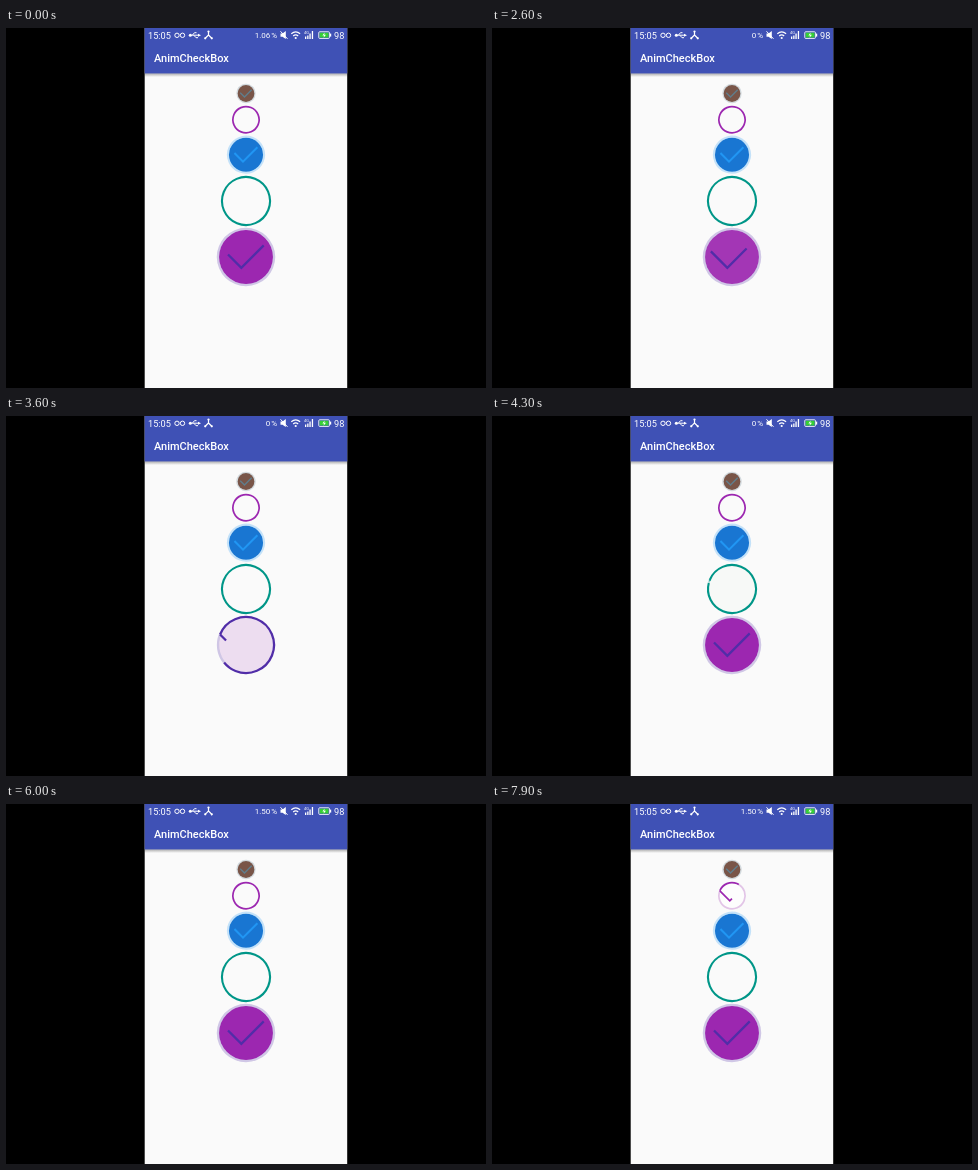
Write an HTML page that moves like this. It is 480x360 px and loops after 8 s.

```html
<!DOCTYPE html>
<html lang="en">
<head>
<meta charset="utf-8">
<title>AnimCheckBox</title>
<style>
  html, body { margin: 0; height: 100%; overflow: hidden; background: #000; }
  svg { display: block; width: 100vw; height: 100vh; }
  text { font-family: Roboto, sans-serif; fill: #fff; }
  .line { fill: none; stroke: #fff; }
</style>
</head>
<body>
<svg id="stage" viewBox="0 0 480 360">
  <defs>
    <linearGradient id="shade" x2="0" y2="1">
      <stop stop-color="#000" stop-opacity=".3"/>
      <stop offset="1" stop-color="#000" stop-opacity="0"/>
    </linearGradient>
  </defs>
  <rect width="480" height="360"/>
  <rect x="138.7" width="202.5" height="360" fill="#fafafa"/>
  <rect x="138.7" width="202.5" height="45.5" fill="#3f51b5"/>
  <rect x="138.7" y="45.5" width="202.5" height="3.5" fill="url(#shade)"/>

  <text x="142" y="10.8" font-size="9.2">15:05</text>
  <text x="148" y="34" font-size="11" font-weight="500">AnimCheckBox</text>
  <text id="rate" x="271" y="10" font-size="8" text-anchor="end"></text>
  <text x="328" y="10.8" font-size="9.2">98</text>

  <!-- infinity, usb, share -->
  <g class="line">
    <circle cx="171" cy="7.3" r="2.2"/>
    <circle cx="176.5" cy="7.3" r="2.2"/>
    <path d="M184 7.2H193M186.5 7L188.5 4.7H190.5M188 7.4L190 9.7H192"/>
    <path d="M202.5 3V7L199 10.5M202.5 7L206 10.5" stroke-width="1.2"/>
  </g>
  <g fill="#fff">
    <circle cx="184.3" cy="7.2" r="1.5"/>
    <path d="M192 5.7L195 7.2L192 8.7Z"/>
    <circle cx="202.5" cy="3.5" r="1.1"/>
    <circle cx="199.2" cy="10.3" r="1.1"/>
    <circle cx="205.8" cy="10.3" r="1.1"/>
    <!-- muted speaker -->
    <path d="M274.5 5.5H276.5L279.8 3V11L276.5 8.7H274.5Z"/>
    <!-- wifi dot and signal bars -->
    <circle cx="289.7" cy="10" r="1.1"/>
    <path d="M299 8.5h1.3V11H299ZM301.2 7.5h1.3V11h-1.3ZM303.4 5.5h1.3V11h-1.3ZM305.8 3h1.3V11h-1.3Z"/>
  </g>
  <path class="line" d="M274.5 3.3L281.5 10.8"/>
  <path class="line" d="M285.3 5.8Q289.7 1.8 294.1 5.8M287.2 8Q289.7 5.8 292.2 8" stroke-width="1.2"/>
  <text x="298" y="6" font-size="4">4G</text>
  <!-- battery -->
  <rect class="line" x="312.8" y="3.8" width="10.6" height="6.6" rx=".8" stroke-width=".9"/>
  <rect x="313.7" y="4.7" width="8.8" height="4.8" fill="#35cf35"/>
  <rect x="324" y="5.6" width="1.2" height="3" fill="#fff"/>
  <path d="M318.6 4.5L316.4 7.4H318.1L317.5 9.7L320 6.7H318.2Z" fill="#fff"/>
</svg>
<script>
const LOOP = 8000, DURATION = 550, CX = 240;
const stage = document.getElementById('stage');
const rate = document.getElementById('rate');

// Taps are the moments, in ms, at which a box is toggled.
const boxes = [
  { cy: 65.5, r: 9, width: 1.4, color: '#607d8b', fill: '#795548', checked: 1, taps: [] },
  { cy: 91.7, r: 13.1, width: 1.7, color: '#9c27b0', fill: '#fff', checked: 0, taps: [7594] },
  { cy: 126.7, r: 18, width: 2.1, color: '#2196f3', fill: '#1976d2', checked: 1, taps: [6430, 7080] },
  { cy: 173, r: 24, width: 2.1, color: '#009688', fill: '#4caf50', checked: 0, taps: [4255, 5206] },
  { cy: 229, r: 28, width: 2.3, color: '#512da8', fill: '#9c27b0', checked: 1, taps: [2506, 3468] }
];

function add(tag, attrs) {
  const el = document.createElementNS('http://www.w3.org/2000/svg', tag);
  for (const key in attrs) el.setAttribute(key, attrs[key]);
  return stage.appendChild(el);
}

for (const b of boxes) {
  const circle = { cx: CX, cy: b.cy };
  const ring = {
    ...circle, r: b.r, fill: 'none', stroke: b.color, 'stroke-width': b.width,
    pathLength: 360, transform: `rotate(202 ${CX} ${b.cy})`
  };
  b.disc = add('circle', { ...circle, r: b.r - b.width / 2 + .1, fill: b.fill });
  b.faint = add('circle', { ...ring, 'stroke-opacity': .25 });
  b.solid = add('circle', ring);
  b.hook = add('path', { fill: 'none', stroke: b.color, 'stroke-width': b.width });
}

// 0 = unchecked, 1 = checked
function progress(b, t) {
  const past = b.taps.filter(tap => tap <= t);
  const state = (b.checked + past.length) % 2;
  if (!past.length) return state;
  const p = Math.min(1, (t - past[past.length - 1]) / DURATION);
  const eased = (1 - Math.cos(Math.PI * p)) / 2;
  return state ? eased : 1 - eased;
}

// The hook grows from the ring's edge, then slides on along its own line.
function hookPath(b, f) {
  const x = CX - .927 * b.r, y = b.cy - .375 * b.r;
  const down = .76 * b.r, size = 1.275 * b.r, head = f * 1.56 * b.r;
  const tail = Math.max(0, head - size);
  const start = `M${x + tail} ${y + tail}`;
  if (head <= down) return `${start}L${x + head} ${y + head}`;
  return `${start}L${x + down} ${y + down}L${x + head} ${y + 2 * down - head}`;
}

function draw(t) {
  rate.textContent = (t < 1940 ? '1.06' : t < 4940 ? '0' : '1.50') + '\u200a%';
  for (const b of boxes) {
    const f = progress(b, t);
    const sweep = 360 * Math.max(0, 1 - f * 1.56 / 1.275);
    b.disc.setAttribute('fill-opacity', f);
    b.solid.setAttribute('stroke-dasharray', sweep < 360 ? `${sweep} 360` : 'none');
    b.faint.setAttribute('stroke-dasharray', sweep > 0 ? `0 ${sweep} ${360 - sweep} 0` : 'none');
    b.solid.setAttribute('visibility', sweep > 0 ? 'visible' : 'hidden');
    b.faint.setAttribute('visibility', sweep < 360 ? 'visible' : 'hidden');
    b.hook.setAttribute('d', f > 0 ? hookPath(b, f) : '');
  }
}

const began = performance.now();
function tick() {
  draw((performance.now() - began) % LOOP);
  requestAnimationFrame(tick);
}
tick();
</script>
</body>
</html>
```
